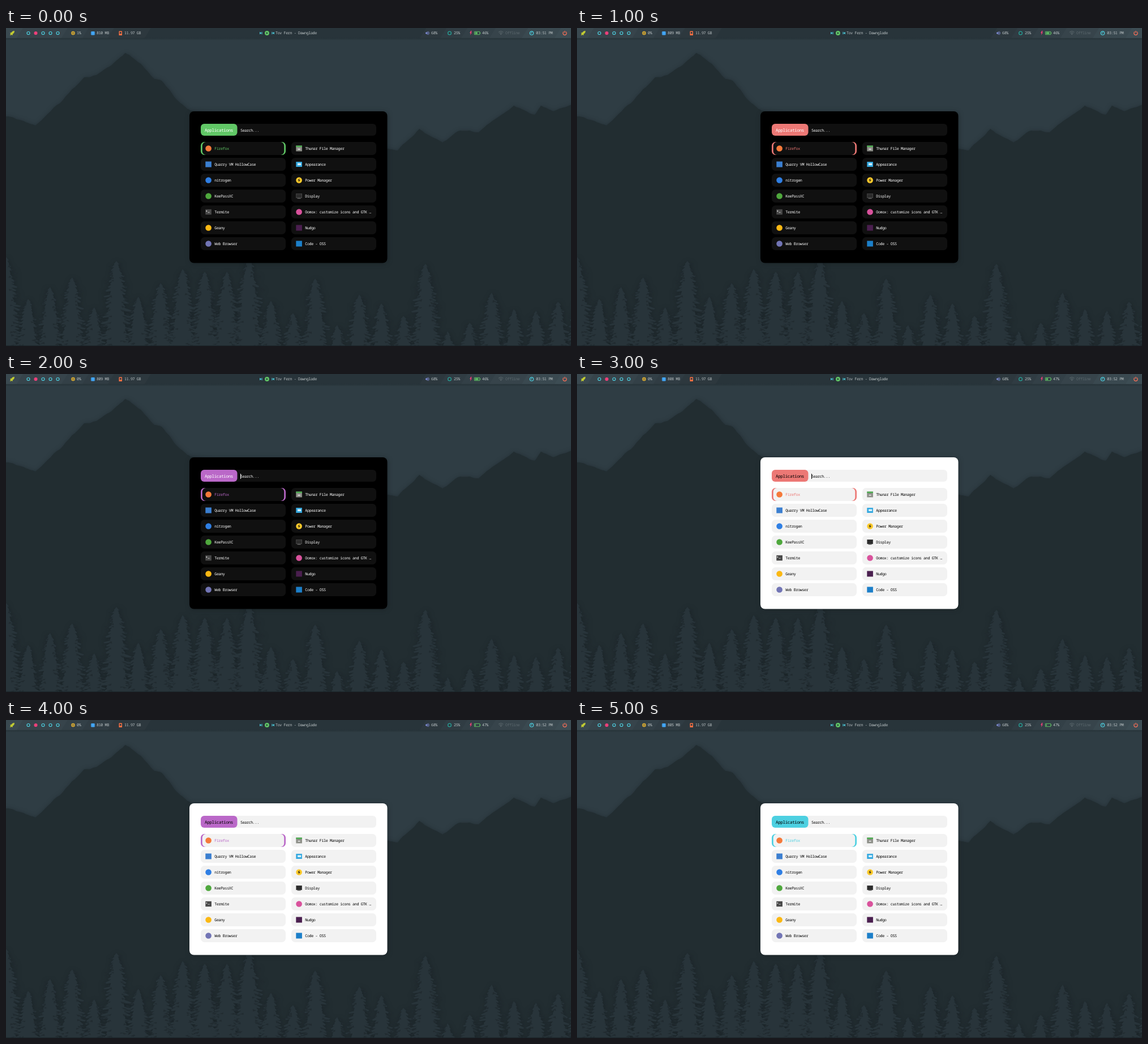
Write an HTML page that moves like this. It is 998 px wide and 561 px high and loops after 6 s.

```html
<!DOCTYPE html>
<html lang="en">
<head>
<meta charset="utf-8">
<title>Launcher themes</title>
<style>
  html, body { margin: 0; width: 100%; height: 100%; overflow: hidden; background: #222d31; }
  svg { display: block; width: 100%; height: 100%; }
  text {
    font: 6.7px "Noto Sans Mono", "DejaVu Sans Mono", monospace;
    letter-spacing: -.055em;
    text-rendering: geometricPrecision;
    white-space: pre;
  }
  #bar text { fill: #bcc3c5; }
  #bar .dim { fill: #5d696e; }
  .panel { fill: var(--panel); }
  .row { fill: var(--row); }
  .accent { fill: var(--accent); }
  .ink { fill: var(--ink); }
  text.prompt { font-size: 7.65px; }
</style>
</head>
<body>
<svg viewBox="0 0 998 561" preserveAspectRatio="none">
  <defs>
    <linearGradient id="fade" x2="0" y2="1">
      <stop stop-color="#11191d" stop-opacity=".35"/><stop offset="1" stop-color="#11191d" stop-opacity="0"/>
    </linearGradient>
    <filter id="shade" x="-5%" y="-10%" width="110%" height="120%" color-interpolation-filters="sRGB">
      <feDropShadow dx="1" dy="1" stdDeviation="4" flood-color="#11191d" flood-opacity=".45"/>
    </filter>
  </defs>
  <rect width="998" height="230" fill="#2f3d44"/>
  <path id="mountain" fill="#222d31" filter="url(#shade)"/>
  <g id="forest" filter="url(#shade)"></g>
  <rect y="560" width="998" height="1" fill="#1b252a"/>
  <g id="bar">
    <rect y="17" width="998" height="5" fill="url(#fade)"/>
    <rect width="998" height="17.5" fill="#28343a"/>
  </g>
  <g id="dialog">
    <rect class="panel" x="324" y="147" width="349.5" height="267.5" rx="8" filter="url(#shade)"/>
    <rect class="row" x="400" y="169" width="254" height="21" rx="6"/>
    <rect class="accent" x="344" y="169" width="64.5" height="21" rx="6"/>
    <text class="ink prompt" x="351" y="182.8">Applications</text>
    <text class="ink" x="414" y="182.9">Search...</text>
    <rect class="ink" id="caret" x="414" y="176" width="1" height="9"/>
  </g>
</svg>

<script>
const $ = id => document.getElementById(id);
const bar = $("bar"), dialog = $("dialog"), forest = $("forest");

function add(parent, tag, attrs, text) {
  const node = document.createElementNS("http://www.w3.org/2000/svg", tag);
  for (const key in attrs) node.setAttribute(key, attrs[key]);
  if (text !== undefined) node.textContent = text;
  parent.append(node);
  return node;
}

let seed = 11;
function random(low = 0, high = 1) {
  seed = (seed * 16807) % 2147483647;
  return low + (high - low) * seed / 2147483647;
}

// Mountain: a few key points, roughened by repeated midpoint displacement
let ridge = [
  [-10, 155], [18, 161], [52, 172], [95, 133], [138, 87], [160, 83], [190, 62], [211, 44], [238, 63],
  [262, 90], [275, 93], [302, 127], [326, 146], [670, 213], [692, 216], [730, 178], [771, 202],
  [802, 181], [835, 184], [862, 162], [897, 137], [934, 153], [945, 137], [967, 147], [1010, 134]];
for (let level = 0; level < 3; level++) {
  ridge = ridge.flatMap(([x, y], i) => {
    const [nextX, nextY] = ridge[i + 1] || [x, y];
    const rough = Math.min(2, (nextX - x) * 0.09);
    return [[x, y], [(x + nextX) / 2, (y + nextY) / 2 + random(-rough, rough)]];
  });
}
$("mountain").setAttribute("d", `M${ridge.join("L")}V575H-10Z`);

// Trees: branches widen with the square root of the depth and break up downwards
function drawTree(x, top) {
  const left = [], right = [];
  let gaps = "";
  for (let y = top + 3; y < 575; y += random(4, 7)) {
    const reach = 3 * Math.sqrt(y - top);
    for (const [side, points] of [[-1, left], [1, right]]) {
      const tip = reach * random(0.5, 1);
      points.push([x + side * tip, y + 2], [x + side * tip * 0.9, y + 4], [x + side * reach * 0.45, y + 3]);
    }
    for (let i = 0; i < reach / 12; i++) {
      const side = random() < 0.5 ? -1 : 1;
      gaps += `M${x + side * reach * random(0.2, 0.9)} ${y}l${side * random(4, 10)} ${random(1, 3)}l${-side * 6} ${random(1, 2)}z`;
    }
  }
  add(forest, "path", { d: `M${[[x, top], ...right, ...left.reverse()].join("L")}Z`, fill: "#28343a" });
  add(forest, "path", { d: gaps, fill: "#212b30" });
}
const treeTops = [
  404, 478, 457, 440, 493, 411, 474, 450, 425, 430, 430, 405, 481, 503,
  442, 524, 470, 486, 508, 416, 535, 520, 467, 496, 499, 483, 468];
treeTops.forEach((top, i) => drawTree(i * 39, top));

// Status bar: slanted blocks, lightest at both ends
const blockShade = i => `hsl(200 16% ${21 + i * 1.5}%)`;
[256, 191, 146, 109, 30].forEach((x, i) =>
  add(bar, "path", { d: `M0 0H${x}l-11 17.5H0z`, fill: blockShade(i) }));
[742, 778, 815, 865, 922, 980].forEach((x, i) =>
  add(bar, "path", { d: `M${x} 0H998V17.5H${x - 11}z`, fill: blockShade(i) }));

const label = (x, text, className = "") => add(bar, "text", { x, y: 11.4, class: className }, text);
const shape = (d, fill) => add(bar, "path", { d, fill });
const line = (d, stroke, width = 1) =>
  add(bar, "path", { d, fill: "none", stroke, "stroke-width": width });
const ring = (cx, r, stroke, fill = "none") =>
  add(bar, "circle", { cx, cy: 9, r, fill, stroke, "stroke-width": 1.2 });
const box = (x, y, width, height, fill) => add(bar, "rect", { x, y, width, height, fill, rx: 0.6 });

const green = "#61c766", red = "#ec7875", purple = "#ba68c8", cyan = "#4dd0e1", pink = "#ec407a";

shape("M15 5q-4 0-5.500 3l-2.500.5 1 1.500-1 3 3-1 1.500 1 .5-2.500q3-1.500 3-5.500z", "#c0ca33");
for (let i = 0; i < 5; i++) ring(39.5 + i * 13, 2.5, i === 1 ? pink : cyan, i === 1 ? pink : "none");
ring(118.5, 2.6, "#fbc02d");
box(117.5, 8, 2, 2, "#fbc02d");
box(150.5, 6, 6, 6.5, "#42a5f5");
line("M149.5 8h8m-8 2.500h8", "#42a5f5", 0.7);
box(199.5, 5.5, 5.5, 7.5, "#ff7043");
box(200.8, 7, 3, 3, "#333f45");

const skip = direction =>
  add(bar, "path", { d: "M8.500-2.300h1v4.600h-1zM12.800-2.300v4.600l-3.200-2.300z", fill: cyan,
    transform: `translate(461 9) scale(${direction} 1)` });
skip(-1);
skip(1);
add(bar, "circle", { cx: 461, cy: 9, r: 3.9, fill: green });
shape("M459.8 7v4l3-2z", "#28343a");
label(476, "Tov Fern - Dawnglade");

shape("M741 7.700h1.600l2-2v6.600l-2-2H741z", "#7986cb");
line("M745.6 7.300q1.500 1.700 0 3.400m.4-4.900q3 3.200 0 6.400", "#7986cb", 0.8);
label(751, "68%");
ring(783.5, 2.9, "#26a69a");
label(791, "25%");
shape("M821 5l-2 4h1.600l-.8 3.800 3.200-5h-1.600l1.400-2.800z", pink);
line("M827.4 6.400h9.400v5.200h-9.400z", green, 0.9);
box(837.2, 7.8, 1, 2.4, green);
const charge = box(828.5, 7.5, 7, 3, green);
line("M870 7.500q4.200-3.500 8.400 0m-6.900 1.800q2.700-2.300 5.400 0", "#5d696e");
shape("M872.7 10.300q1.500-1 3 0l-1.500 2z", "#5d696e");
label(882, "Offline", "dim");
ring(928.5, 3.2, cyan);
line("M928.5 7v2.200h-1.700", cyan, 0.8);
line("M985.2 6.500a3.200 3.200 0 1 0 3.600 0M987 5v3.600", "#ff7058", 1.2);

const cpu = label(125, ""), memory = label(160, "");
label(209, "11.97 GB");
const battery = label(841, ""), clock = label(936.3, "");

// Launcher entries: name, icon kind, icon colour
const entries = [
  ["Firefox", "circle", "#f5793a"], ["Thunar File Manager", "cabinet"],
  ["Quarry VM HollowCase", "square", "#3b7fd0"], ["Appearance", "window"],
  ["nitrogen", "circle", "#2f7fe4"], ["Power Manager", "power"],
  ["KeePassXC", "circle", "#4fa83d"], ["Display", "screen"],
  ["Termite", "terminal"], ["Oomox: customize icons and GTK …", "circle", "#d9529c"],
  ["Geany", "circle", "#fbb813"], ["Nudgo", "square", "#4a1f4f"],
  ["Web Browser", "circle", "#7275b5"], ["Code - OSS", "square", "#1c7fc9"]];

// Each icon is a stack of [path, colour] around its own centre
const disc = "M-5.300 0a5.300 5.300 0 1 0 10.600 0a5.300 5.300 0 1 0-10.600 0";
const plate = "M-5.300-5h10.600v10h-10.600z";
const icons = {
  circle: color => [[disc, color]],
  square: color => [[plate, color]],
  cabinet: () => [[plate, "#8d8f88"], ["M-5.300-5h10.600v2.500h-10.600z", "#4caf50"], ["M-2 .5h4v1.500h-4z", "#eee"]],
  window: () => [["M-5.300-4.500h10.600v9h-10.600z", "#35a9e0"], ["M-2.500-2h6v3.500h-6z", "#d9f1fb"]],
  power: () => [[disc, "#fdc92b"], ["M1-3.800l-3.300 4.300h2l-.8 3.300 3.400-4.400h-2z", "#332b12"]],
  screen: () => [["M-5.300-4.500h10.600v8h-10.600z", "#555"], ["M-4.700-4h9.400v7h-9.400z", "#2c2c2c"], ["M-3 3.500h6v1.200h-6z", "#666"]],
  terminal: () => [["M-5.300-4.700h10.600v9.400h-10.600z", "#484848"], ["M-4-3l2 1.500-2 1.500zM-1 .2h3v.8h-3z", "#eee"]]
};

entries.forEach(([name, kind, color], i) => {
  const x = i % 2 ? 504 : 344, y = 201 + (i >> 1) * 28;
  const selected = i === 0;
  const slab = (className, inset) =>
    add(dialog, "rect", { class: className, x: x + inset, y, width: 150 - 2 * inset, height: 23, rx: 6.5 });
  if (selected) slab("accent", 0);
  slab("row", selected ? 2.7 : 0);
  const icon = add(dialog, "g", { transform: `translate(${x + 13.6} ${y + 11.5})` });
  for (const [d, fill] of icons[kind](color)) add(icon, "path", { d, fill });
  add(dialog, "text", { class: selected ? "accent" : "ink", x: x + 24.3, y: y + 14 }, name);
});

// One state per second
const states = [
  { accent: green, cpu: 1, memory: 810, charge: 0.6 },
  { accent: red, cpu: 0, memory: 809, charge: 0.85 },
  { accent: purple, cpu: 0, memory: 809, charge: 0.85, caret: true },
  { accent: red, cpu: 0, memory: 808, charge: 0.5, caret: true, light: true },
  { accent: purple, cpu: 0, memory: 810, charge: 0.2, light: true },
  { accent: cyan, cpu: 0, memory: 805, charge: 0.2, light: true }];

function show(state) {
  const colors = state.light
    ? { panel: "#fff", row: "#f2f2f2", ink: "#000" }
    : { panel: "#000", row: "#101010", ink: "#fff" };
  colors.accent = state.accent;
  for (const name in colors) dialog.style.setProperty("--" + name, colors[name]);
  $("caret").style.display = state.caret ? "" : "none";
  cpu.textContent = state.cpu + "%";
  memory.textContent = state.memory + " MB";
  battery.textContent = state.light ? "47%" : "46%";
  clock.textContent = state.light ? "03:52 PM" : "03:51 PM";
  charge.setAttribute("width", 7 * state.charge);
}

let shown;
function tick() {
  const state = states[Math.floor(performance.now() / 1000) % states.length];
  if (state !== shown) show(shown = state);
  requestAnimationFrame(tick);
}
tick();
</script>
</body>
</html>
```
